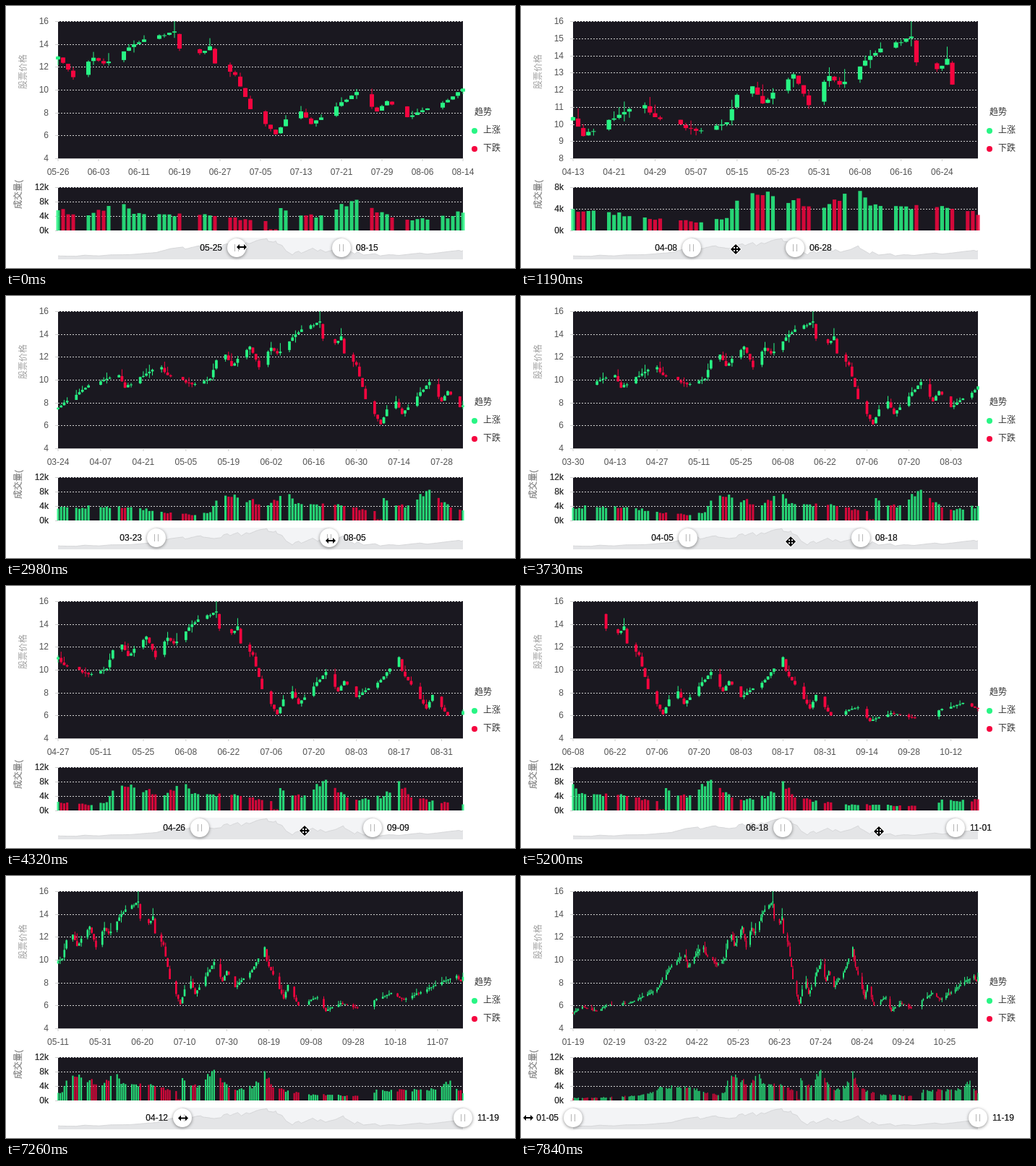
An HTML page with a canvas that plays this animation: 704 by 363 pixels, repeating every 7.99 s.

```html
<!DOCTYPE html>
<html lang="zh">
<head>
<meta charset="utf-8">
<style>
html, body { margin: 0; width: 100%; height: 100%; overflow: hidden; background: #fff; }
canvas { display: block; }
</style>
</head>
<body>
<canvas id="stage" width="704" height="363"></canvas>
<script>
const ctx = document.getElementById('stage').getContext('2d');
const LOOP = 7990, STEP = 148;
const LEFT = 72, RIGHT = 632, WIDTH = RIGHT - LEFT, LAST_DAY = 318;
const UP = '#28f584', DOWN = '#f5053f';
const FONT = '12px "Liberation Sans", "Noto Sans CJK SC", "Noto Sans CJK", sans-serif';

// Turning points [day, value]; day 0 is Monday, 5 January.
const closePoints = [
  [0, 5.5], [14, 5.3], [21, 5.9], [32, 5.5], [42, 6.1], [56, 6.2], [77, 7.4], [88, 9.5],
  [98, 10.4], [100, 9.3], [108, 10.7], [112, 11.1], [114, 10.4], [122, 9.6], [128, 10.1],
  [130, 11.7], [133, 12.2], [135, 11.2], [141, 12.9], [144, 11.1], [148, 12.8], [150, 12.3],
  [158, 14.4], [164, 15.1], [165, 13.6], [169, 13.2], [171, 13.8], [172, 12.3], [176, 11.3],
  [179, 8.3], [184, 6.1], [186, 7.4], [189, 8.1], [191, 7], [200, 9.8], [204, 8.1], [206, 9],
  [210, 7.6], [218, 9.1], [224, 11.1], [225, 9.9], [233, 6.6], [235, 7.8], [240, 6],
  [249, 6.7], [253, 5.5], [260, 6.2], [268, 5.8], [284, 7.1], [290, 6.5], [315, 8.6],
  [317, 8.1], [318, 8.5]
];
const volumePoints = [
  [0, 0.6], [35, 0.8], [60, 1.3], [75, 2.2], [80, 3.8], [101, 3.6], [115, 2.2], [123, 1.5],
  [128, 2.3], [130, 5.5], [134, 6.6], [141, 5.6], [147, 4.2], [154, 7.3], [156, 4.6], [172, 4],
  [182, 2.6], [183, 0.3], [184, 0.3], [185, 6.2], [192, 3.6], [196, 5.8], [200, 8.5], [204, 5],
  [211, 2.8], [219, 4], [224, 8.1], [228, 3.6], [242, 1.7], [268, 1.3], [278, 2.8], [305, 3],
  [312, 5.5], [318, 2]
];
const holidays = [[44, 50], [91, 91], [116, 116], [168, 168], [241, 242], [269, 275]];

// [step, left handle, right handle]
const sliderKeys = [
  [0, 319, 464], [2, 319, 464], [7, 241, 384.6], [8, 236, 379], [11, 208, 351], [14, 208, 351],
  [19, 208, 444.5], [20, 208, 447], [23, 208, 447], [28, 265.3, 504.3], [29, 268, 507],
  [34, 342.8, 581.8], [35, 362, 601], [38, 363, 602], [41, 393, 632], [46, 393, 632],
  [52, 95, 632], [53, 72, 632]
];
// [step, x, y]
const cursorKeys = [
  [0, 326, 334], [2, 380, 336], [8, 297, 337], [11, 269, 338], [13, 352, 338], [14, 352, 338],
  [20, 449, 339], [21, 410, 346], [23, 353, 341], [29, 413, 339], [35, 495, 340], [38, 497, 340],
  [42, 566, 340], [45, 394, 336], [46, 394, 336], [52, 96, 335], [53, 10, 335]
];

const lerp = (a, b, u) => a + (b - a) * u;
const hash = n => { const s = Math.sin(n * 12.9898) * 43758.5453; return s - Math.floor(s); };

// Interpolates rows whose first entry is the position.
function along(rows, pos) {
  const n = Math.max(1, rows.findIndex(r => r[0] >= pos));
  const a = rows[n - 1], b = rows[n];
  const u = (pos - a[0]) / (b[0] - a[0]);
  return a.slice(1).map((v, i) => lerp(v, b[i + 1], u));
}

function sample(points, day, seed, noise) {
  const [value] = along(points, day);
  const fixed = points.some(p => p[0] === day);
  return fixed ? value : value * (1 + (hash(day + seed) - 0.5) * 2 * noise);
}

const days = [];
for (let day = 0, prev = 5.5; day <= LAST_DAY; day++) {
  if (day % 7 > 4 || holidays.some(([a, b]) => day >= a && day <= b)) continue;
  const close = sample(closePoints, day, 0, 0.008);
  const open = lerp(close, prev, 0.85);
  days.push({
    day, open, close,
    high: Math.min(16, Math.max(open, close) * (day === 164 ? 1.06 : 1 + 0.06 * hash(day + 400) ** 2)),
    low: Math.min(open, close) * (1 - 0.04 * hash(day + 800) ** 2),
    volume: sample(volumePoints, day, 1200, 0.14),
    color: close >= open ? UP : DOWN
  });
  prev = close;
}

const toDay = x => (x - LEFT) / WIDTH * LAST_DAY;
const inside = ([left, right], d) => d.day >= toDay(left) && d.day <= toDay(right);

function dateLabel(day) {
  return new Date(Date.UTC(2015, 0, 5 + Math.floor(day + 1e-6))).toISOString().slice(5, 10);
}

function text(str, x, y, align, color, strong) {
  ctx.fillStyle = color;
  ctx.textAlign = align;
  for (let i = 0; i <= (strong ? 1 : 0); i++) ctx.fillText(str, x, y);
}

function vertical(str, x, y, align, color, strong) {
  ctx.save();
  ctx.translate(x, y);
  ctx.rotate(-Math.PI / 2);
  text(str, 0, 0, align, color, strong);
  ctx.restore();
}

function rect(x, y, w, h, color) {
  ctx.fillStyle = color;
  ctx.fillRect(x, y, w, h);
}

function line(x1, y1, x2, y2, color, dash = []) {
  ctx.strokeStyle = color;
  ctx.lineWidth = 1;
  ctx.setLineDash(dash);
  ctx.beginPath();
  ctx.moveTo(x1, y1);
  ctx.lineTo(x2, y2);
  ctx.stroke();
  ctx.setLineDash([]);
}

function disc(x, y, r, color) {
  ctx.fillStyle = color;
  ctx.beginPath();
  ctx.arc(x, y, r, 0, Math.PI * 2);
  ctx.fill();
}

// Dark panel with horizontal grid; returns the value-to-y scale.
function panel(top, bottom, lo, hi, step, unit, strong) {
  const scale = v => lerp(bottom, top, (v - lo) / (hi - lo));
  rect(LEFT, top, WIDTH, bottom - top, '#1a1820');
  for (let v = lo; v <= hi; v += step) {
    const y = Math.round(scale(v));
    if (v > lo) line(LEFT, y + 0.5, RIGHT, y + 0.5, '#cfcfcf', [2, 2]);
    text(v + unit, 59, y + 0.5, 'right', strong ? '#333' : '#545454', strong);
    line(LEFT - 4, y + 0.5, LEFT, y + 0.5, '#d0d0d0');
  }
  return scale;
}

function drawCharts(slider, lagged) {
  const shown = days.filter(d => inside(lagged, d));
  const first = shown[0].day, span = shown[shown.length - 1].day - first;
  const xOf = day => LEFT + (day - first) / span * WIDTH;
  const slot = WIDTH / shown.length;

  const min = Math.min(...shown.map(d => d.low)) * 0.96;
  const max = Math.ceil(Math.max(...shown.map(d => d.high)));
  const step = max - Math.floor(min) > 8 ? 2 : 1;
  const lo = Math.floor(min / step) * step, hi = Math.ceil(max / step) * step;
  const yOf = panel(21, 211, lo, hi, step, '', false);
  line(LEFT, 211.5, RIGHT, 211.5, '#bfbfbf');

  const tick = Math.ceil(span / 10);
  for (let day = first; day <= first + span; day += tick) {
    line(xOf(day), 211, xOf(day), 215, '#ccc');
    text(dateLabel(day), xOf(day), 231, 'center', '#545454');
  }

  const body = slot * 0.62;
  for (const d of shown.filter(d => inside(slider, d))) {
    const x = xOf(d.day), top = yOf(Math.max(d.open, d.close));
    rect(x - 0.5, yOf(d.high), 1, yOf(d.low) - yOf(d.high), d.color);
    rect(x - body / 2, top, body, Math.max(1, Math.abs(yOf(d.open) - yOf(d.close))), d.color);
  }

  const maxVolume = Math.ceil(Math.max(...shown.map(d => d.volume)) / 4) * 4;
  const vOf = panel(251, 311, 0, maxVolume, 4, 'k', true);
  const bar = slot * 0.52;
  ctx.globalAlpha = 0.85;
  for (const d of shown) rect(xOf(d.day) - bar / 2, vOf(d.volume), bar, 311 - vOf(d.volume), d.color);
  ctx.globalAlpha = 1;

  vertical('股票价格', 25, 91, 'center', '#a0a0a0');
  vertical('成交量(', maxVolume > 8 ? 18 : 25, 281, 'left', '#8c8c8c', true);
}

function drawLegend() {
  text('趋势', 648, 148, 'left', '#333');
  [['上涨', UP, 173], ['下跌', DOWN, 198]].forEach(([label, color, y]) => {
    disc(648, y, 4, color);
    text(label, 660, y, 'left', '#333');
  });
}

function drawHandle(x) {
  ctx.save();
  ctx.shadowColor = 'rgba(0,0,0,.45)';
  ctx.shadowBlur = 4;
  ctx.shadowOffsetY = 1;
  disc(x, 335, 13, '#fff');
  ctx.restore();
  for (const dx of [-2.5, 2.5]) line(x + dx, 330, x + dx, 340, '#b5b5b5');
}

function drawSlider([left, right]) {
  rect(left, 321, right - left, 30, '#f3f4f6');
  const trend = new Path2D();
  days.forEach(d => trend.lineTo(LEFT + d.day / LAST_DAY * WIDTH, 351 - (d.close - 3.6) * 2.5));
  const area = new Path2D(trend);
  area.lineTo(RIGHT, 351);
  area.lineTo(LEFT, 351);
  ctx.fillStyle = '#e4e5e7';
  ctx.fill(area);
  ctx.lineWidth = 1;
  ctx.strokeStyle = '#d6d7d9';
  ctx.stroke(trend);
  drawHandle(left);
  drawHandle(right);
  text(dateLabel(toDay(left)), left - 20, 336, 'right', '#222', true);
  text(dateLabel(toDay(right)), right + 20, 336, 'left', '#222', true);
}

const arrow = new Path2D('M-7 0L-3-4V-1H3V-4L7 0L3 4V1H-3V4Z');
const cross = new Path2D(arrow);
cross.addPath(arrow, new DOMMatrix([0, 1, -1, 0, 0, 0]));

function drawCursor([x, y], onHandle) {
  const shape = onHandle ? arrow : cross;
  ctx.save();
  ctx.translate(x, y);
  ctx.strokeStyle = '#fff';
  ctx.lineWidth = 2;
  ctx.stroke(shape);
  ctx.fillStyle = '#000';
  ctx.fill(shape);
  ctx.restore();
}

function draw(now) {
  const step = Math.min(53, Math.floor((now % LOOP + 10) / STEP));
  const slider = along(sliderKeys, step);
  const lagged = along(sliderKeys, Math.max(0, step - 1));
  const onHandle = step < 1 || (step > 12 && step < 21) || step > 44;
  rect(0, 0, 704, 363, '#fff');
  ctx.font = FONT;
  ctx.textBaseline = 'middle';
  drawCharts(slider, lagged);
  drawLegend();
  drawSlider(slider);
  drawCursor(along(cursorKeys, step), onHandle);
}

const start = performance.now();
function frame() {
  draw(performance.now() - start);
  requestAnimationFrame(frame);
}
frame();
</script>
</body>
</html>
```
